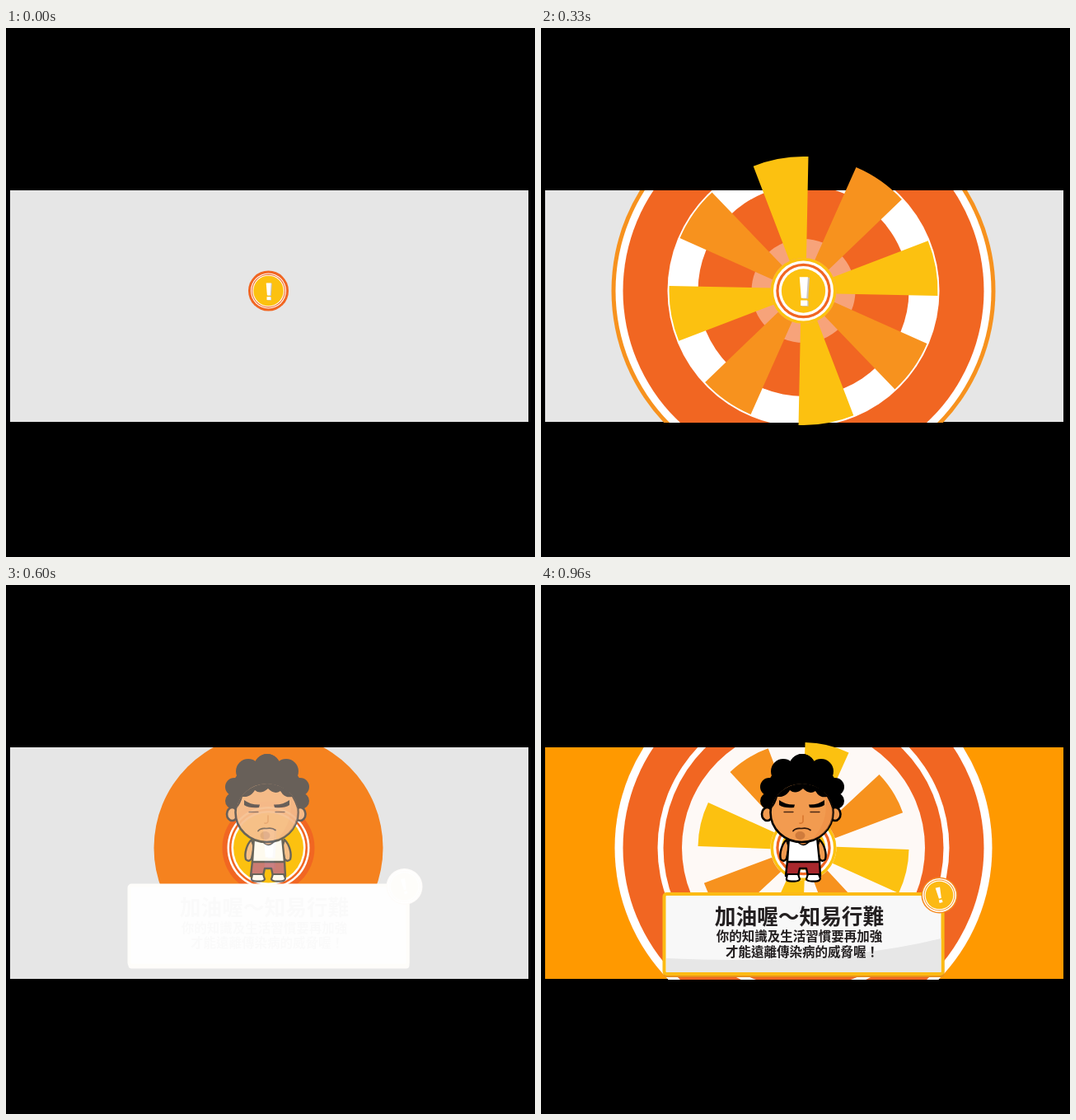
These frames come from a looping animation (642x642 px, 0.99 s). An HTML page:

```html
<!DOCTYPE html>
<html lang="zh-Hant">
<head>
<meta charset="utf-8">
<title>Burst card</title>
<style>
html, body { margin: 0; width: 100%; height: 100%; overflow: hidden; background: #000; }
svg { display: block; width: 100vw; height: 100vh; }
text { font-family: "Noto Sans CJK TC", "Noto Sans CJK JP", "Noto Sans CJK", sans-serif; font-weight: 900; fill: #231f20; text-anchor: middle; }
</style>
</head>
<body>
<svg viewBox="0 0 642 642">
  <defs>
    <clipPath id="window"><rect x="5" y="197" width="629" height="282"/></clipPath>
    <clipPath id="face"><ellipse cx="317" cy="276" rx="37.5" ry="35"/></clipPath>
    <filter id="manTint" color-interpolation-filters="sRGB">
      <feComponentTransfer><feFuncR type="linear"/><feFuncG type="linear"/><feFuncB type="linear"/></feComponentTransfer>
    </filter>
    <filter id="cardTint" color-interpolation-filters="sRGB">
      <feComponentTransfer><feFuncR type="linear"/><feFuncG type="linear"/><feFuncB type="linear"/></feComponentTransfer>
    </filter>
  </defs>
  <rect width="642" height="642"/>
  <rect id="back" x="5" y="197" width="629" height="281"/>
  <g id="discs" clip-path="url(#window)"></g>
  <g id="hub"></g>
  <g id="rays"></g>
  <g id="mark">
    <path d="M-1.6-10.2H4.4L3.4 5H-.4ZM-1.2 6.7H3.6V10.5H-1.2Z" fill="#c9c4bd"/>
    <path d="M-2.8-10.5H3.2L2.2 4.5H-1.6ZM-2 6.2H2.8V10H-2Z" fill="#fff"/>
  </g>

  <g id="man" stroke-linecap="round" stroke-linejoin="round">
    <g fill="#f29b50" stroke="#000" stroke-width="2.4">
      <path d="M298 309C292 315 289 326 291 333Q295 337 298 332L301 318Z"/>
      <path d="M338 309C344 315 347 326 345 333Q341 337 338 332L335 318Z"/>
    </g>
    <path d="M299 335H338L339 353H324L322 344H314L312 353H297Z" fill="#a9282d" stroke="#000" stroke-width="2.4"/>
    <path d="M301 306H335L338 336H299Z" fill="#fff" stroke="#000" stroke-width="2.4"/>
    <path d="M309 308Q318 323 328 308Z" fill="#e98b41" stroke="#000" stroke-width="1.4"/>
    <g fill="#fff" stroke="#000" stroke-width="2.2">
      <path d="M299 351H312L314 357Q313 360 306 359.5Q297 360 298 356Z"/>
      <path d="M324 351H337L339 356Q339 360 331 359.5Q323 360 322 357Z"/>
    </g>
    <g id="hair"></g>
    <g fill="#f29b50" stroke="#000" stroke-width="2.6">
      <ellipse cx="274.500" cy="278" rx="6.500" ry="8"/>
      <ellipse cx="357" cy="278" rx="6.500" ry="8"/>
      <ellipse cx="316.500" cy="276" rx="38" ry="36"/>
    </g>
    <g clip-path="url(#face)">
      <path d="M343 250Q353 285 327 311H360V250Z" fill="#ea8b40" opacity=".45"/>
      <path d="M276 238H358V277L353 270Q350 262 347 257Q338 259 333 250Q326 255 318 247Q309 255 302 249Q297 258 287 257Q285 265 280 271L276 278Z"/>
    </g>
    <path d="M289 261Q297 267 308 266.500L307 270Q295 271 289 267ZM344 261Q336 267 325 266.500L326 270Q338 271 344 267Z"/>
    <path d="M295 275.500H306M327 275.500H338" fill="none" stroke="#4a2815" stroke-width="1.300"/>
    <path d="M318 280V287Q317 290 314 289" fill="none" stroke="#d9772f" stroke-width="1.600"/>
    <ellipse cx="314.500" cy="304" rx="6" ry="5" fill="#cf7b3c"/>
    <path d="M306 298.500Q309 294.500 316 295.500Q323 294 327 297.500" fill="none" stroke="#2a140a" stroke-width="1.700"/>
  </g>

  <g id="card">
    <rect x="148.500" y="374.500" width="341" height="101.500" rx="4" fill="#e8921c"/>
    <rect id="paper" x="149.500" y="375" width="338" height="97" rx="3" stroke="#fcbb14" stroke-width="4"/>
    <path d="M152 453Q350 462 485.500 429V470H152Z" fill="#e7e7e7"/>
    <text x="313.500" y="411.500" font-size="25.700">加油喔～知易行難</text>
    <text x="313.500" y="432" font-size="15.500">你的知識及生活習慣要再加強</text>
    <text x="317" y="450.500" font-size="15.500">才能遠離傳染病的威脅喔！</text>
    <g transform="translate(483.500 376.500)">
      <circle r="22" fill="#f58a20"/>
      <circle r="20.500" fill="#fff"/>
      <circle r="19" fill="#f7931e"/>
      <circle r="18" fill="#fff"/>
      <circle r="16.800" fill="#fcb913"/>
      <path d="M-2.800-9.500H2.800L1.500 4H-1.500ZM-2 5.800H2V9.200H-2Z" fill="#fff" transform="rotate(-13)"/>
    </g>
  </g>
</svg>
<script>
const CX = 318.5, CY = 319, STEP = 30, FRAMES = 33, BURST = 17;
const ORANGE = [241, 102, 34], AMBER = [247, 146, 30], YELLOW = [252, 193, 16];
const $ = id => document.getElementById(id);

function add(parent, tag, attrs) {
  const el = document.createElementNS("http://www.w3.org/2000/svg", tag);
  set(el, attrs);
  parent.appendChild(el);
  return el;
}
function set(el, attrs) {
  for (const k in attrs) el.setAttribute(k, attrs[k]);
}
// Piecewise linear curve through x, y pairs
function curve(...p) {
  return x => {
    if (x <= p[0]) return p[1];
    for (let i = 2; i < p.length; i += 2) {
      if (x <= p[i]) return p[i - 1] + (p[i + 1] - p[i - 1]) * (x - p[i - 2]) / (p[i] - p[i - 2]);
    }
    return p[p.length - 1];
  };
}
const clamp = x => Math.max(0, Math.min(1, x));
const mix = (a, b, k) => `rgb(${a.map((v, i) => Math.round(v + (b[i] - v) * clamp(k)))})`;
const rgb = c => mix(c, c, 0);

// Burst radii over the steps of one burst
const discs = [
  { r: curve(0, 0, 1, 50, 3, 139, 5, 200, 7, 232, 8, 233, 14, 233, 15, 229), fill: p => mix([245, 130, 31], AMBER, (p - 3) / 4) },
  { r: curve(4, 0, 5, 85, 6, 150, 7, 200, 8, 224, 11, 228, 15, 229), a: curve(4, .4, 7, .88, 8, .98, 11, 1), fill: () => "#fff" },
  { r: curve(5, 0, 6, 75, 7, 130, 8, 180, 9, 201, 11, 219), fill: () => rgb(ORANGE) },
  { r: curve(7, 0, 8, 106, 9, 135, 11, 165, 14, 177), fill: () => "#fff" },
  { r: curve(7, 0, 8, 47, 9, 84, 11, 128, 14, 170), fill: () => rgb(ORANGE) },
  { r: curve(9, 0, 11, 63, 12, 98, 14, 143, 16, 152), a: curve(9, .2, 11, .4, 14, .92, 15, .96), fill: () => "#fff" }
];
const hubOuter = curve(0, 24.5, 3, 56, 7, 66, 8, 47, 11, 40);
const hubWhite = curve(0, 21.5, 3, 50, 7, 57, 8, 32, 11, 36.5);
const hubGap = curve(8, .05, 11, .09);
const rayIn = curve(4, 50, 7, 62, 8, 46, 11, 40);
const rayOut = curve(4, 55, 5, 102, 6, 145, 7, 170, 8, 178, 9, 180, 11, 163, 14, 132, 15, 128, 16, 126);
const spin = curve(0, -176, 8, 6.7, 14, 153.5, 24, 363.5, 28, 455.3, 32, 553.2);

const manTint = curve(370, 0, 420, .14, 600, .63, 720, 1);
const manAlpha = curve(360, 0, 420, .8, 600, .93, 720, 1);
const cardShift = curve(570, -17, 600, -10.5, 660, -4, 720, 0, 840, 2, 960, 0);

for (const d of discs) d.el = add($("discs"), "circle", { cx: CX, cy: CY });
const rings = Array.from({ length: 5 }, () => add($("hub"), "circle", { cx: CX, cy: CY }));
const rays = Array.from({ length: 8 }, (_, i) => add($("rays"), "path", { fill: rgb(i % 2 ? AMBER : YELLOW) }));

add($("hair"), "ellipse", { cx: 317, cy: 249, rx: 43, ry: 35 });
for (const [x, y, r] of [[317, 221, 16], [294, 226, 15], [277, 245, 11], [276, 262, 10]]) {
  add($("hair"), "circle", { cx: x, cy: y, r });
  add($("hair"), "circle", { cx: 634 - x, cy: y, r });
}

function tint(group, filter, k) {
  for (const fn of $(filter).querySelectorAll("feFuncR, feFuncG, feFuncB")) set(fn, { slope: k, intercept: 1 - k });
  if (k < 1) set($(group), { filter: `url(#${filter})` });
  else $(group).removeAttribute("filter");
}

function rayPath(a, b) {
  const half = r => 2.6 + .192 * r;
  const point = (r, side) => `${side * half(r)} ${-Math.sqrt(r * r - half(r) ** 2)}`;
  return `M${point(a, -1)}L${point(b, -1)}A${b} ${b} 0 0 1 ${point(b, 1)}L${point(a, 1)}A${a} ${a} 0 0 0 ${point(a, -1)}Z`;
}

function draw(frame) {
  const t = frame * STEP, p = frame % BURST;
  set($("back"), { fill: mix([230, 230, 230], [255, 153, 0], (t - 630) / 330) });

  for (const d of discs) set(d.el, { r: d.r(p), fill: d.fill(p), "fill-opacity": d.a ? d.a(p) : 1 });

  const w = hubWhite(p), g = hubGap(p);
  const outer = mix(ORANGE, YELLOW, (p - 8) / 3);
  [[hubOuter(p), outer], [w, "#fff"], [w * (1 - g), rgb(ORANGE)], [w * (1 - 2 * g), "#fff"], [w * (1 - 3 * g), rgb(YELLOW)]]
    .forEach(([r, fill], i) => set(rings[i], { r, fill }));
  set($("mark"), { transform: `translate(${CX} ${CY + 1}) scale(${w / 21.5})`, opacity: clamp((13 - p) / 2) });

  set($("rays"), { visibility: p > 4 ? "visible" : "hidden" });
  const shape = rayPath(rayIn(p), rayOut(p));
  rays.forEach((ray, i) => set(ray, { d: shape, transform: `translate(${CX} ${CY}) rotate(${spin(frame) + i * 45})` }));

  set($("man"), { opacity: manAlpha(t) });
  tint("man", "manTint", manTint(t));

  set($("card"), { opacity: t < 570 ? 0 : t < 600 ? .6 : 1, transform: `translate(0 ${cardShift(t)})` });
  set($("paper"), { fill: mix([250, 246, 236], [248, 248, 248], (t - 840) / 120) });
  tint("card", "cardTint", clamp(.02 + (t - 600) / 240));
}

let last = -1;
function tick() {
  const frame = Math.floor(performance.now() / STEP) % FRAMES;
  if (frame !== last) draw(last = frame);
  requestAnimationFrame(tick);
}
tick();
</script>
</body>
</html>
```
